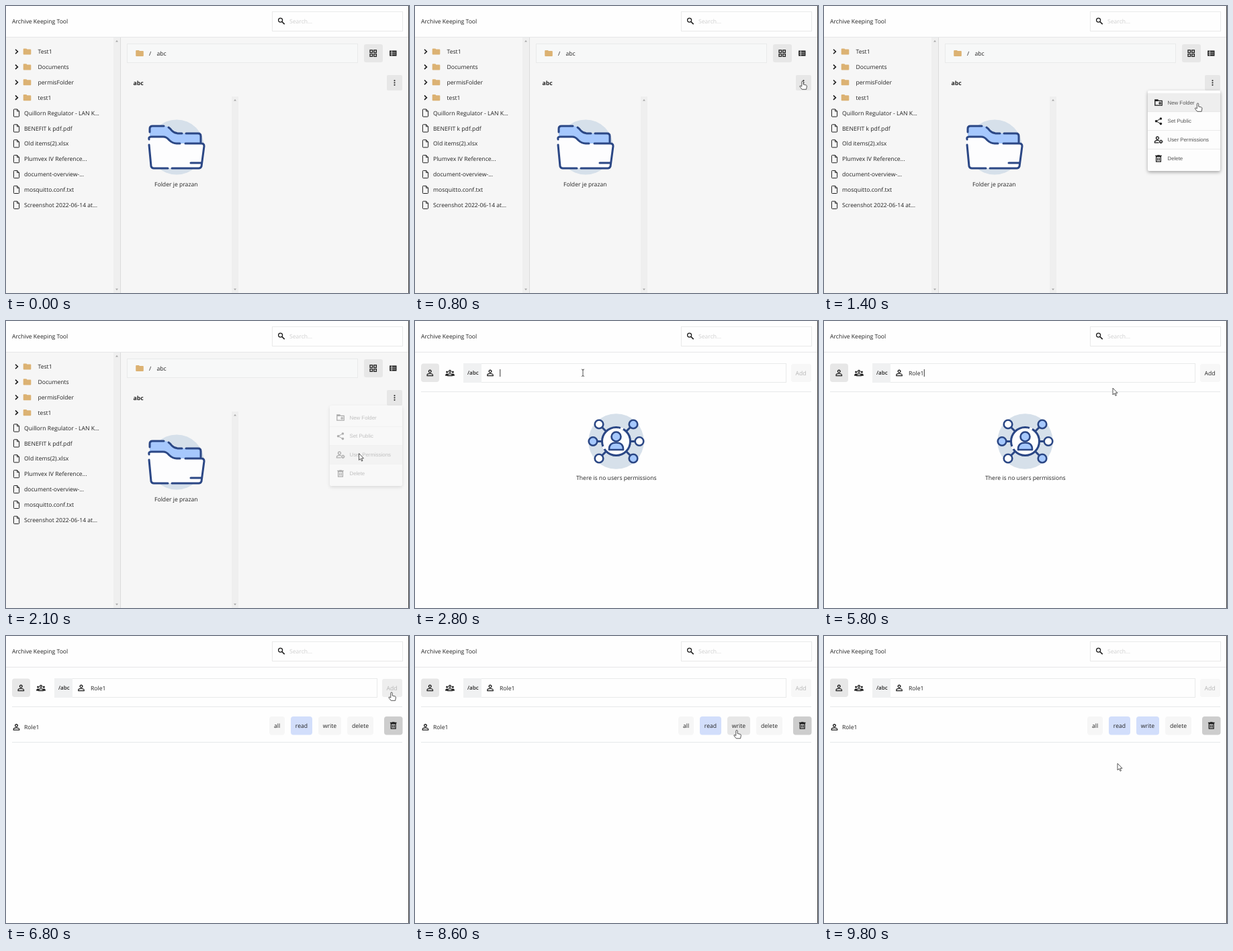
An HTML page that plays this animation: 600x428 px, repeating every 9900 ms.

```html
<!DOCTYPE html>
<html lang="en">
<head>
<meta charset="utf-8">
<title>Folder permissions</title>
<style>
  html, body { margin: 0; width: 100%; height: 100%; overflow: hidden; background: #fefefe; }
  svg { display: block; width: 600px; height: 428px; }
  text { font: 8.65px "Open Sans", "Noto Sans", sans-serif; fill: #222; text-rendering: geometricPrecision; white-space: pre; }
  .bold { font-weight: 700; }
  .menu text { font: 7.85px "Liberation Sans", Arial, sans-serif; fill: #555; }
  .line { fill: none; stroke: #1d1d1d; stroke-width: 1.3; }
  .navy { stroke: #2b4785; stroke-width: 3; stroke-linecap: round; stroke-linejoin: round; }
</style>
</head>
<body>
<svg id="stage" viewBox="0 0 600 428"></svg>
<script>
const LOOP = 9900;
const NAVY_FILL = '#a6c8fd';

const rect = (x, y, w, h, fill, extra = '') =>
  `<rect x="${x}" y="${y}" width="${w}" height="${h}" fill="${fill}" ${extra}/>`;
const box = (x, y, w, h, fill = 'none') =>
  rect(x + .5, y + .5, w - 1, h - 1, fill, 'stroke="#e9eaea"');
const label = (x, y, words, extra = '') => `<text x="${x}" y="${y}" ${extra}>${words}</text>`;
const path = (d, extra = '') => `<path d="${d}" ${extra}/>`;
const circle = (x, y, r, extra = '') => `<circle cx="${x}" cy="${y}" r="${r}" ${extra}/>`;
const at = (x, y, body, scale = 1) => `<g transform="translate(${x} ${y}) scale(${scale})">${body}</g>`;
const group = (id, body, extra = '') => `<g id="${id}" ${extra}>${body}</g>`;

// Icons are centred on their own origin.
const icons = {
  search: circle(-1.4, -1.4, 3, 'class="line"') + path('M1 1L4.7 4.7', 'class="line" style="stroke-width:1.7"'),
  folder: path('M-5.8-3.6q0-1 1-1H-1.2L0-3.4H4.8q1 0 1 1V3.6q0 1-1 1H-4.8q-1 0-1-1z', 'fill="#dcb273"'),
  chevron: path('M-1.7-3.3L1.7 0L-1.7 3.3', 'class="line" style="stroke-width:1.6"'),
  file: path('M-4.1-4.6q0-1 1-1H1.2L4.1-2.7V4.6q0 1-1 1H-3.1q-1 0-1-1zM1.1-5.4V-2.6H4', 'class="line" style="stroke-width:1"'),
  person: circle(0, -2.4, 1.85, 'class="line"') + path('M-4.2 4.2V3.1C-4.2 .2 4.2 .2 4.2 3.1V4.2z', 'class="line"'),
  people: [-4.3, 4.3].map(x => circle(x, -1.5, 1.5, 'fill="#1d1d1d"') +
      path(`M${x - 2.5} 4.2V3q0-2 2.5-2t2.5 2V4.2z`, 'fill="#1d1d1d"')).join('') +
    circle(0, -2.4, 1.6, 'class="line" style="fill:#fefefe"') +
    path('M-3.2 4V3C-3.2 .5 3.2 .5 3.2 3V4z', 'class="line" style="fill:#fefefe"'),
  trash: path('M-3.4-2.7H3.4V4.7H-3.4zM-4.8-4H4.8M-1.8-4.6H1.8M-1.2-.8V3M1.2-.8V3', 'class="line"'),
  newFolder: path('M-5.2-4H-1.2L0-2.7H5.2V4.2H-5.2zM2.2-1.2V3M.1 .9H4.3', 'class="line"') + rect(-5, -4, 4, 2, '#1d1d1d'),
  share: path('M3.4-3.8L-3.4 0L3.4 3.8', 'class="line" style="stroke-width:1"') +
    [[3.4, -3.8], [-3.4, 0], [3.4, 3.8]].map(([x, y]) => circle(x, y, 1.8, 'fill="#1d1d1d"')).join(''),
  manage: circle(-1.5, -2.6, 2, 'class="line"') + path('M1 1.1C-2 .2-5.6 1.2-5.6 3.2V4.2H.6', 'class="line"') +
    circle(3.6, 2.7, 1.7, 'class="line"') + circle(3.6, 2.7, 2.5, 'class="line" style="stroke-width:1;stroke-dasharray:1 .96"'),
  dots: [-3.2, 0, 3.2].map(y => circle(0, y, 1.05, 'fill="#1d1d1d"')).join(''),
  grid: [-2.9, 2.9].map(x => [-2.9, 2.9].map(y => rect(x - 1.8, y - 1.8, 3.6, 3.6, 'none', 'class="line"')).join('')).join(''),
  list: rect(-5.2, -4, 10.4, 8, '#1d1d1d') +
    path('M-4.2-1.4H4.2M-4.2 1.3H4.2M-2-4V4', 'stroke="#f6f6f6" stroke-width=".8"'),
};
const icon = (name, x, y, scale) => at(x, y, icons[name], scale);

const scrollbar = (x, top) => rect(x - 5, top, 10, 428 - top, '#efefef') +
  path(`M${x - 2} ${top + 6.5}h4l-2-2.5zM${x - 2} 421.5h4l-2 2.5z`, 'fill="#a5a5a5"');

const header = rect(0, 0, 600, 46, '#fefefe') + rect(0, 46, 600, 1, '#e6e7e8') +
  label(9, 26, 'Archive Keeping Tool') + box(396, 8, 195, 30) +
  icon('search', 410, 22.5) + label(422, 26, 'Search...', 'style="fill:#cfcfcf"');

const folders = ['Test1', 'Documents', 'permisFolder', 'test1'];
const files = ['Quillorn Regulator - LAN K...', 'BENEFIT k pdf.pdf', 'Old items(2).xlsx',
  'Plumvex IV Reference...', 'document-overview-...', 'mosquitto.conf.txt', 'Screenshot 2022-06-14 at...'];
const sidebar = [...folders, ...files].map((name, i) => {
  const y = 68 + i * 22.88;
  return i < folders.length
    ? icon('chevron', 15.7, y) + icon('folder', 31.5, y) + label(47.5, y + 3.2, name)
    : icon('file', 15.5, y) + label(27, y + 3.2, name);
}).join('');

const emptyFolder = circle(254, 210.5, 41, 'fill="#d6e0ea"') +
  path('M214 200V183Q214 179 218 179H236Q241 179 245 184Q250 190 257 190H286Q290 190 290 194V207H214z', `fill="${NAVY_FILL}"`) +
  path('M212 196H234Q239 196 243 200Q248 205 254 205H291Q295 205 295 209L291 239Q290 242 287 242H220Q217 242 216 239L212 205z', 'fill="#fdfdfe"') +
  path('M214 188V183Q214 179 218 179H235M242 181Q245 183 247 186Q251 190 257 190H262M268 190H286Q290 190 290 194V204' +
    'M213 199Q212 195 216 195H234Q239 195 243 200Q248 205 254 205H259M267 205H291Q295 205 295 209L291 239Q290 242 287 242H247' +
    'M241 242H220Q217 242 216 239L213 207M275 234H291', 'class="navy" fill="none"') +
  label(221, 269, 'Folder je prazan');

const home = rect(0, 47, 600, 381, '#f6f6f6') + sidebar + scrollbar(165, 47) + rect(170, 47, 1, 381, '#dcdcdc') +
  box(180, 56, 344, 29, '#f7f8f8') + icon('folder', 199, 70.5) + label(213, 74, '/') + label(224.5, 74, 'abc') +
  rect(533, 57, 28, 27, '#e7e7e7', 'rx="3"') + icon('grid', 546.7, 70.5) + icon('list', 576.3, 70.5) +
  label(189.5, 118, 'abc', 'class="bold"') + rect(567, 103, 23, 23, '#e7e7e7', 'rx="2"') + icon('dots', 578.5, 114.5) +
  scrollbar(341, 135) + emptyFolder;

const menuItems = [['newFolder', 'New Folder'], ['share', 'Set Public'], ['manage', 'User Permissions'], ['trash', 'Delete']];
const ROW = 27.8;
const menu = rect(482, 126, 108, 120, '#fdfdfd', 'rx="2" style="filter:drop-shadow(0 2px 2.5px #0005)"') +
  rect(482, 130, 108, ROW, '#eee', 'id="menuHover"') +
  menuItems.map(([name, words], i) => {
    const y = 144 + i * ROW;
    return (i ? rect(482, 129.5 + i * ROW, 108, .8, '#e6e6e6') : '') + icon(name, 498, y) + label(511.5, y + 2.6, words);
  }).join('');

const nodes = [[274, 154, 0], [325, 154, 1], [265, 179.5, 1], [334, 179.5, 0], [274, 205, 0], [325, 205, 1]];
const emptyUsers = circle(299.5, 179.5, 41.3, 'fill="#d6e0ea"') +
  nodes.map(([x, y, filled]) => path(`M${x} ${y}L${299.5 + (x - 299.5) * .6} ${179.5 + (y - 179.5) * .6}`, 'class="navy"') +
    circle(x, y, 6.3, `class="navy" style="stroke-width:2.6" fill="${filled ? NAVY_FILL : '#fefefe'}"`)).join('') +
  circle(299.5, 179.5, 21, 'class="navy" fill="#fefefe"') +
  path('M306 159.5l4 1.7M280 187l1.8 4' , 'stroke="#fefefe" stroke-width="3.4"') +
  circle(299.5, 172.5, 7, `class="navy" style="stroke-width:2.6" fill="${NAVY_FILL}"`) +
  path('M289 192Q288.5 181.5 299.5 181.5T310 192z', `class="navy" style="stroke-width:2.6" fill="${NAVY_FILL}"`) +
  label(240, 237, 'There is no users permissions');

const button = (id, x, w, words) => rect(x, 120, w, 27.5, '#f6f6f6', `id="${id}" rx="4"`) +
  label(x + w / 2, 136.5, words, 'text-anchor="middle"');
const permissionRow = icon('person', 15.5, 136) + label(27, 139, 'Role1') +
  button('all', 392, 23, 'all') + button('read', 424, 32, 'read') +
  button('write', 465, 34, 'write') + button('delete', 508, 39, 'delete') +
  rect(563, 120, 27.5, 27.5, '#cdcdcd', 'rx="4"') + icon('trash', 576.7, 133.5) + rect(9, 158, 581, 1, '#e6e9ea');

const permissions = rect(0, 47, 600, 381, '#fefefe') +
  rect(9, 63.5, 27, 27.5, '#e7e7e7', 'rx="4"') + icon('person', 22.3, 77.5) + icon('people', 52, 77.5) +
  box(72, 63, 481, 29) + rect(72, 63, 27, 29, '#f0f1f2') +
  label(78, 80.4, '/abc', 'style="font-weight:600;font-size:8px"') +
  icon('person', 112, 77.5) + label(126, 80.6, '', 'id="typed"') + rect(0, 72, .9, 11, '#222', 'id="caret"') +
  rect(560, 64, 30, 27, '#f7f7f7', 'id="addBox" rx="3"') + label(566.5, 80.6, 'Add', 'id="add"') +
  rect(9, 105, 581, 1, '#e6e9ea') + group('emptyUsers', emptyUsers) + group('row', permissionRow);

const pointer = extra => `fill="#fff" stroke="#444" stroke-width=".9" stroke-linejoin="round" ${extra}`;
const cursors = path('M0 0V10L2.3 7.9L4 11.5L5.5 10.8L3.9 7.3H7z', pointer('id="arrow"')) +
  path('M-1.2 1.2a1.2 1.2 0 0 1 2.4 0V5l4 .9q1.3.4 1.2 2L5.6 12.3H-.8L-4 8.3q-.5-1.5 1-1.2L-1.2 8z', pointer('id="hand"')) +
  path('M-2-1Q0-1 0 .5Q0-1 2-1M0 0V8M-2 9.5Q0 9.5 0 8Q0 9.5 2 9.5', 'id="beam" fill="none" stroke="#444" stroke-width=".9"');

const stage = document.getElementById('stage');
stage.innerHTML = group('home', home) + group('permissions', permissions) + header +
  group('menu', menu, 'class="menu"') + rect(599, 0, 1, 428, '#3c3c3c') + group('cursor', cursors);
const el = Object.fromEntries([...stage.querySelectorAll('[id]')].map(node => [node.id, node]));

// time, x, y, shape held until the next stop
const pointerStops = [
  [0, 520, 420, ''], [300, 520, 420, 'arrow'], [800, 577, 112, 'hand'], [1100, 577, 112, 'hand'],
  [1400, 556.5, 145, 'hand'], [1900, 525.5, 197.5, 'hand'], [2100, 525.5, 197.5, 'arrow'],
  [2300, 525.5, 197.5, 'arrow'], [2800, 250, 73, 'beam'], [4000, 250, 73, ''], [5800, 430, 100, 'arrow'],
  [6100, 574, 84, 'hand'], [7000, 574, 84, 'hand'], [7200, 560, 93, 'arrow'], [7600, 484, 138, 'hand'],
  [8300, 479, 140.5, 'hand'], [8600, 479, 140.5, 'hand'], [8900, 470, 154, 'arrow'],
  [9200, 470, 154, 'arrow'], [9800, 437, 190, 'arrow'], [LOOP, 437, 190, 'arrow'],
];
const typing = [[0, ''], [4000, 'R'], [4200, 'Ro'], [4400, 'Rol'], [4500, 'Role'], [4800, 'Role1']];
const menuFade = [[0, 0], [1100, .45], [1200, 1], [2100, .33], [2200, 0]];
const caretBlink = [[0, 0], [2800, 1], [3300, 0], [3800, 1], [5300, 0], [5800, 1], [6100, 0]];
const writeFill = [[0, '#f6f6f6'], [7600, '#e7e7e7'], [8700, '#d2defb']];
const addFill = [[0, '#f7f7f7'], [6100, '#eeeeee'], [7200, '#f7f7f7']];

const held = (steps, t) => steps.filter(([start]) => start <= t).pop()[1];
const show = (node, visible) => { node.style.display = visible ? '' : 'none'; };

function pointerAt(t) {
  const i = Math.max(0, pointerStops.findIndex(stop => stop[0] > t) - 1);
  const [t0, x0, y0, shape] = pointerStops[i];
  const [t1, x1, y1] = pointerStops[i + 1];
  const p = (t - t0) / (t1 - t0);
  const eased = p * p * (3 - 2 * p);
  return { x: x0 + (x1 - x0) * eased, y: y0 + (y1 - y0) * eased, shape };
}

function draw(t) {
  const { x, y, shape } = pointerAt(t);
  el.cursor.setAttribute('transform', `translate(${x} ${y})`);
  for (const name of ['arrow', 'hand', 'beam']) show(el[name], name === shape);

  show(el.home, t < 2300);
  show(el.permissions, t >= 2300);
  el.menu.setAttribute('opacity', held(menuFade, t));
  const hovered = Math.floor((y - 130) / ROW);
  show(el.menuHover, hovered >= 0 && hovered < menuItems.length);
  el.menuHover.setAttribute('y', 130 + hovered * ROW);

  el.typed.textContent = held(typing, t);
  show(el.caret, held(caretBlink, t));
  el.caret.setAttribute('x', 126 + (t < 4000 || t >= LOOP ? 0 : el.typed.getComputedTextLength()) + .3);
  el.add.style.fill = t >= 4000 && t < 6100 ? '#222' : '#b5b5b5';
  el.addBox.setAttribute('fill', held(addFill, t));

  show(el.emptyUsers, t < 6800);
  show(el.row, t >= 6800);
  el.read.setAttribute('fill', '#d2defb');
  el.write.setAttribute('fill', held(writeFill, t));
}

function tick() {
  draw(Math.floor(performance.now() % LOOP / 100) * 100);
  requestAnimationFrame(tick);
}
tick();
</script>
</body>
</html>
```
